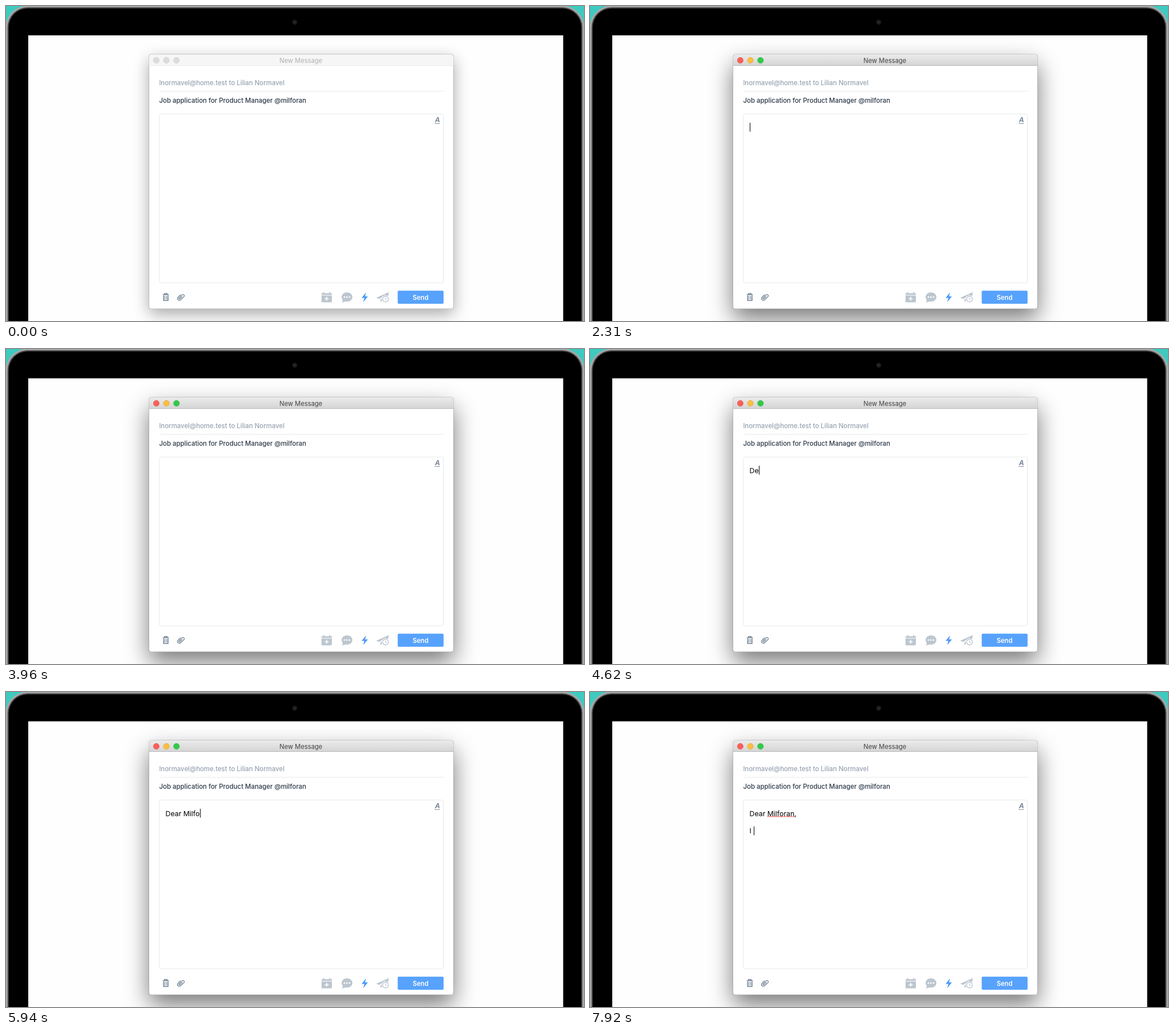
Recreate the animation shown at these times as an HTML page. Size 1013 px wide and 553 px high, loop 8000 ms.

```html
<!DOCTYPE html>
<html lang="en">
<head>
<meta charset="utf-8">
<title>New Message</title>
<style>
  html, body { margin: 0; width: 100%; height: 100%; overflow: hidden; background: #3fcac0; }
  svg { display: block; }
  text { font-family: Inter, "Open Sans", sans-serif; font-size: 11.4px; white-space: pre; }
  .field { font-weight: 500; }
  .typed { font-size: 12.3px; fill: #000; }
  .shadow { filter: blur(14px); opacity: .34; transform: translateY(9px); }
  .title { font-size: 11.2px; fill: #b1b1b1; }
  .bar { fill: #f6f6f6; }
  .barline { stroke: #e9e9e9; }
  .light { fill: #dcdcdc; stroke: #cdcdcd; }
  .active .shadow { filter: blur(21px); opacity: .52; transform: translateY(18px); }
  .active .title { fill: #424242; }
  .active .bar { fill: url(#barFill); }
  .active .barline { stroke: #b9b9b9; }
  .active .red { fill: #fc605b; stroke: #e2504b; }
  .active .amber { fill: #fdbd41; stroke: #e0a332; }
  .active .green { fill: #34c94a; stroke: #2bb03d; }
</style>
</head>
<body>
<svg width="1013" height="553" viewBox="0 0 1013 553">
  <defs>
    <linearGradient id="barFill" x2="0" y2="1">
      <stop stop-color="#ebebeb"/><stop offset="1" stop-color="#d4d4d4"/>
    </linearGradient>
  </defs>

  <!-- laptop -->
  <rect width="1013" height="553" fill="#3fcac0"/>
  <rect x="-.5" y="-.5" width="1014" height="640" rx="38" fill="#a7a8a8"/>
  <rect x="2.8" y="2.3" width="1007.4" height="640" rx="35" fill="#4b4b4b"/>
  <rect x="4.8" y="4.3" width="1003.4" height="640" rx="33" fill="#000"/>
  <circle cx="506" cy="28.5" r="4.3" fill="#1d1d1f"/>
  <circle cx="506" cy="28.5" r="1.8" fill="#292a2e"/>
  <rect x="39" y="51.5" width="937.5" height="510" fill="#fefefe"/>

  <!-- mail window -->
  <g id="win">
    <rect class="shadow" x="250.5" y="85" width="534" height="446.5" rx="4"/>
    <rect x="250" y="84.5" width="535" height="447.5" rx="5" fill="#000" opacity=".27"/>
    <rect x="250.7" y="85.2" width="533.6" height="446.3" rx="4.5" fill="#fff"/>
    <path class="bar" d="M250.7 105V89.7a4.5 4.5 0 0 1 4.5-4.5H779.8a4.5 4.5 0 0 1 4.5 4.5V105z"/>
    <path class="barline" d="M250.7 104.5H784.3"/>
    <circle class="light red" cx="263.4" cy="95.4" r="5.1" stroke-width=".7"/>
    <circle class="light amber" cx="281.1" cy="95.4" r="5.1" stroke-width=".7"/>
    <circle class="light green" cx="298.8" cy="95.4" r="5.1" stroke-width=".7"/>
    <text class="title" x="516.8" y="99.5" text-anchor="middle">New Message</text>
  </g>

  <text class="field" x="268.5" y="138.7" fill="#96a3b0">lnormavel@home.test to Lilian Normavel</text>
  <path d="M269 149.8H767" stroke="#e4e7ea"/>
  <text class="field" x="268.5" y="169.8" fill="#2c3a49">Job application for Product Manager @milforan</text>
  <rect x="268.7" y="189.7" width="497.8" height="296.3" rx="3" fill="#fff" stroke="#e6e8eb"/>
  <text x="756.2" y="204.4" text-anchor="middle" fill="#7c8b9b"
        style="font-size:12px;font-weight:700;font-style:italic">A</text>
  <path d="M751 206.3H760.5" stroke="#7c8b9b"/>

  <!-- toolbar -->
  <g fill="none" stroke="#6f8295">
    <path d="M274.8 506.7H285.4M277.8 506V504.8H282.4V506" stroke-width="1.4"/>
    <path d="M276.3 508.2V517H283.9V508.2" stroke-width="1.6"/>
    <path d="M278.7 509V515.3M281.5 509V515.3" stroke-width="1.1"/>
    <path transform="translate(306.4 511) rotate(45)" stroke-width="1.3" stroke-linecap="round"
          d="M-3.3 -2V3.5A3.3 3.3 0 0 0 3.3 3.5V-4.2A2.3 2.3 0 0 0 -1.3 -4.2V3A1.1 1.1 0 0 0 1 3V-2.3"/>
  </g>
  <g fill="#bcc6cf">
    <path d="M553 504.2H556V502.3H558V504.2H566.3V502.3H568.3V504.2H571.2V507.2H553z"/>
    <path d="M553 508.3H571.2V519a1.3 1.3 0 0 1-1.3 1.3H554.3a1.3 1.3 0 0 1-1.3-1.3z"/>
    <path d="M558.6 513.9H565.6M562.1 510.4V517.4" stroke="#fff" stroke-width="1.5"/>
    <ellipse cx="597.6" cy="510.9" rx="9.5" ry="8.2"/>
    <path d="M590 514C590.5 517 590 518.8 588.6 520.2C591.6 520.2 594 519.4 596 517.8z"/>
    <g fill="#fff">
      <circle cx="593.1" cy="511" r="1.4"/>
      <circle cx="597.6" cy="511" r="1.4"/>
      <circle cx="602.1" cy="511" r="1.4"/>
    </g>
    <path d="M671 502.3L648.8 512.3L654.3 514.3L666.3 506L656.5 515.3V520L659.3 517L668 518z"/>
    <circle cx="665.2" cy="514.5" r="6.6" fill="#fff"/>
    <circle cx="665.2" cy="514.5" r="5" fill="#fff" stroke="#bcc6cf" stroke-width="1.3"/>
    <path d="M665.2 511.5V514.8H667.7" fill="none" stroke="#bcc6cf" stroke-width="1.1"/>
  </g>
  <path d="M631 502.8L623.2 512.6H628L626 520L634.3 509.8H629.3z" fill="#4c9bf8"/>
  <rect x="686.5" y="499.8" width="80.4" height="23" rx="2" fill="#57a2fc"/>
  <text x="726.5" y="515.6" text-anchor="middle" fill="#fff" font-weight="600"
        style="font-size:11.2px">Send</text>

  <!-- message -->
  <text class="typed" id="line0" x="279.6" y="217.6"></text>
  <text class="typed" id="line2" x="279.6" y="248.2"></text>
  <path id="spelling" stroke="#f4463c" stroke-width="1.5" stroke-dasharray="1.8 1.1" opacity="0"/>
  <rect id="caret" width="1" height="15.5" fill="#000"/>
</svg>
<script>
const LOOP = 8000, LEFT = 280;
const ROW_TOPS = [205, 220, 236];
const GREETING = "Dear Milforan,";
const $ = id => document.getElementById(id);
const lines = { 0: $("line0"), 2: $("line2") };

// time, typed letters of the greeting, caret row (-1 hides it), third line
const STEPS = [
  [0, 0, -1], [1320, 0, 0], [1980, 0, -1], [2310, 0, 0], [2970, 0, -1],
  [3300, 0, 0], [3960, 0, -1], [4290, 0, 0],
  [4620, 2, 0], [4950, 4, 0], [5280, 5, 0], [5610, 7, 0], [5940, 10, 0], [6270, 13, 0],
  [6600, 14, 1], [6930, 14, 2], [7260, 14, -1], [7920, 14, 2, "I "]
];

function textWidth(text) {
  lines[0].textContent = text;
  return text ? lines[0].getComputedTextLength() : 0;
}

const wordStart = LEFT + textWidth(GREETING.slice(0, 5));
const wordEnd = LEFT + textWidth(GREETING.slice(0, -1));
$("spelling").setAttribute("d", `M${wordStart} 218.7H${wordEnd}`);

let shown;
function show(step) {
  if (step === shown) return;
  shown = step;
  const [time, count, row, third = ""] = step;
  $("win").classList.toggle("active", time > 0);
  lines[0].textContent = GREETING.slice(0, count);
  lines[2].textContent = third;
  $("spelling").setAttribute("opacity", count === GREETING.length ? 1 : 0);
  const line = lines[row];
  const width = line && line.textContent ? line.getComputedTextLength() : 0;
  $("caret").setAttribute("opacity", row < 0 ? 0 : 1);
  $("caret").setAttribute("x", Math.round(LEFT + width));
  $("caret").setAttribute("y", ROW_TOPS[Math.max(row, 0)]);
}

const start = performance.now();
function tick() {
  const t = (performance.now() - start) % LOOP;
  show(STEPS.findLast(step => step[0] <= t) || STEPS[0]);
  requestAnimationFrame(tick);
}
tick();
</script>
</body>
</html>
```
